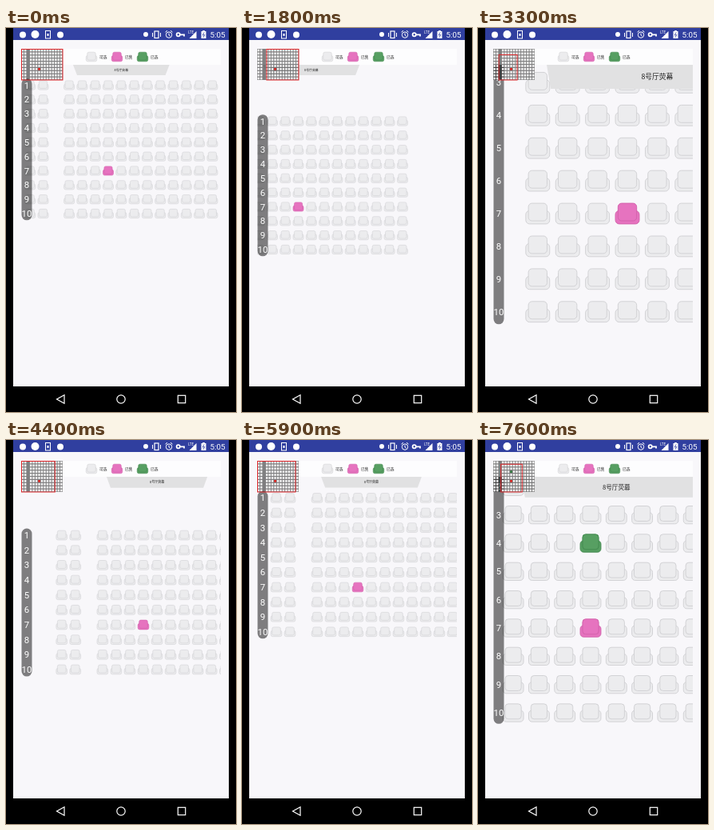
An HTML page with a canvas for the animation above (8 s loop, 288x480 px).

```html
<!DOCTYPE html>
<html lang="zh">
<head>
<meta charset="utf-8">
<title>选座</title>
<style>
  html, body { margin: 0; width: 100%; height: 100%; overflow: hidden; background: #000; }
  canvas { display: block; width: 288px; height: 480px; }
</style>
</head>
<body>
<canvas id="stage"></canvas>
<script>
const LOOP = 8000, STEP = 100, TAP_TIME = 7000;
const ROWS = 10, COLS = 15, AISLE = 2;
const SEAT_W = 0.8, SEAT_H = 0.69, ROW_PITCH = 1.094; // relative to the column pitch
const SOLD = { row: 6, col: 6 }, PICKED = { row: 3, col: 6 };
const VIEW = { left: 19, top: 26, right: 269, bottom: 448, head: 46 };
const CJK = '"Noto Sans CJK SC", "Noto Sans CJK", "Noto Sans CJK JP", sans-serif';
const LATIN = 'Roboto, sans-serif';
const SEAT_COLORS = {
  free: ['#ececee', '#d2d2d5'],
  sold: ['#e673bf', '#d362ac'],
  picked: ['#579f62', '#438a50']
};

// Each move eases to a pose: centre of the sold seat and column pitch.
const START = [128, 178.5, 16.3];
const MOVES = [
  [0, 500, 140.5, 178.5, 16.3],
  [900, 1400, 47.2, 238.5, 16.3],
  [1600, 2200, 140.5, 178.5, 16.3],
  [2800, 3200, 193, 239.4, 40.3],
  [3200, 3300, 187, 232, 37.4],
  [3300, 3400, 176, 219, 32.3],
  [3900, 4200, 172.5, 230, 17.6],
  [4300, 4400, 172, 231, 17.05],
  [4700, 5300, 145, 184, 17],
  [6900, 7200, 141, 235, 32.3]
];

const canvas = document.getElementById('stage');
const ctx = canvas.getContext('2d');
const ratio = window.devicePixelRatio || 1;
canvas.width = 288 * ratio;
canvas.height = 480 * ratio;
ctx.scale(ratio, ratio);

function poseAt(time) {
  let pose = START;
  for (const [from, to, ...goal] of MOVES) {
    if (time <= from) break;
    const p = Math.min(1, (time - from) / (to - from));
    const eased = (1 - Math.cos(p * Math.PI)) / 2;
    pose = pose.map((v, i) => v + (goal[i] - v) * eased);
  }
  return pose;
}

function box(x, y, w, h, color) {
  ctx.fillStyle = color;
  ctx.fillRect(x, y, w, h);
}

function roundBox(x, y, w, h, r) {
  ctx.beginPath();
  ctx.roundRect(x, y, w, h, r);
}

function disc(x, y, r, color = '#fff') {
  ctx.beginPath();
  ctx.arc(x, y, r, 0, Math.PI * 2);
  ctx.fillStyle = color;
  ctx.fill();
}

function line(points, { close, fill, stroke, width = 1 }) {
  ctx.beginPath();
  points.forEach(([x, y]) => ctx.lineTo(x, y));
  if (close) ctx.closePath();
  if (fill) { ctx.fillStyle = fill; ctx.fill(); }
  if (stroke) { ctx.strokeStyle = stroke; ctx.lineWidth = width; ctx.stroke(); }
}

function label(text, x, y, size, color, family, align = 'center') {
  ctx.font = `${size}px ${family}`;
  ctx.textAlign = align;
  ctx.textBaseline = 'alphabetic';
  ctx.fillStyle = color;
  ctx.fillText(text, x, y);
}

function drawSeat(cx, cy, pitch, kind) {
  const w = pitch * SEAT_W, h = pitch * SEAT_H, x = cx - w / 2, y = cy - h / 2;
  [ctx.fillStyle, ctx.strokeStyle] = SEAT_COLORS[kind];
  ctx.lineWidth = Math.min(1, pitch * 0.035);
  roundBox(x, y + h * 0.36, w, h * 0.64, w * 0.16);
  ctx.fill();
  ctx.stroke();
  roundBox(x + w * 0.11, y, w * 0.78, h * 0.85, w * 0.15);
  ctx.fill();
  ctx.stroke();
}

function kindOf(row, col, time) {
  const is = seat => seat.row === row && seat.col === col;
  if (is(SOLD)) return 'sold';
  return is(PICKED) && time >= TAP_TIME ? 'picked' : 'free';
}

function eachSeat(draw) {
  for (let row = 0; row < ROWS; row++)
    for (let col = 0; col < COLS; col++)
      if (col !== AISLE) draw(row, col);
}

function drawNumbers(firstY, pitch) {
  const pad = pitch * SEAT_H / 2 + 2.7, rowPitch = pitch * ROW_PITCH;
  roundBox(19.5, firstY - pad, 13, rowPitch * (ROWS - 1) + pad * 2, 6.5);
  ctx.fillStyle = 'rgba(0,0,0,.494)';
  ctx.fill();
  for (let row = 0; row < ROWS; row++)
    label(row + 1, 26, firstY + row * rowPitch + 4, 11.4, '#fff', LATIN);
}

function drawHeader() {
  box(VIEW.left, VIEW.top, 250, 20, '#fdfdfe');
  [['free', '可选'], ['sold', '已售'], ['picked', '已选']].forEach(([kind, text], i) => {
    drawSeat(107 + i * 32, 36, 16.8, kind);
    label(text, 117 + i * 32, 37.8, 4.7, '#222', CJK, 'left');
  });
}

function drawScreen(centerX, pitch) {
  const half = pitch * 3.7, top = VIEW.head, bottom = top + pitch * 0.8;
  line([[centerX - half, top], [centerX + half, top],
    [centerX + half - 5, bottom], [centerX - half + 5, bottom]], { close: true, fill: '#e1e1e2' });
  const size = pitch * 0.235;
  label('8号厅荧幕', centerX, (top + bottom) / 2 + size * 0.37, size, '#222', CJK);
}

function drawOverview(firstX, firstY, pitch, time) {
  const { left, top } = VIEW, w = 52, h = 39, cellW = w / COLS, cellH = h / ROWS;
  box(left, top, w, h, 'rgba(0,0,0,.494)');
  const colors = { free: '#f4f4f4', sold: '#e8201c', picked: '#2c7a3a' };
  eachSeat((row, col) => box(left + col * cellW + 0.5, top + row * cellH + 0.6,
    cellW - 1, cellH - 1.2, colors[kindOf(row, col, time)]));

  const seatLeft = firstX - pitch * SEAT_W / 2, seatTop = firstY - pitch * SEAT_H / 2;
  const toX = x => left + Math.min(w, Math.max(0, (x - seatLeft) / pitch * 3.5));
  const toY = y => top + Math.min(h, Math.max(0, (y - seatTop) / (pitch * ROW_PITCH) * cellH));
  const x0 = toX(left), x1 = toX(VIEW.right), y0 = toY(VIEW.head), y1 = toY(VIEW.bottom);
  ctx.strokeStyle = '#e0282c';
  ctx.lineWidth = 1;
  ctx.strokeRect(x0 + 0.5, y0 + 0.5, x1 - x0 - 0.5, y1 - y0 - 0.5);
}

function drawStatusBar() {
  box(9, 0, 270, 15, '#303f9f');
  const white = { stroke: '#fff', width: 1 };
  disc(21, 8.5, 4);
  disc(36.5, 8, 5);
  ctx.strokeStyle = '#fff';
  ctx.lineWidth = 1;
  ctx.strokeRect(49.5, 3.5, 6, 9.5);
  box(51.5, 7, 2, 3, '#fff');
  disc(68, 8.5, 4);
  disc(175, 8, 3);

  ctx.lineWidth = 1.2;
  ctx.strokeRect(186, 4, 5, 8.5);
  line([[183.5, 6], [183.5, 11]], white);
  line([[193.5, 6], [193.5, 11]], white);

  ctx.beginPath();
  ctx.arc(204, 8.6, 3.7, 0, Math.PI * 2);
  ctx.stroke();
  line([[204, 6.5], [204, 9], [205.5, 10]], white);
  line([[199.5, 5.2], [202, 3.2]], white);
  line([[206, 3.2], [208.5, 5.2]], white);

  ctx.lineWidth = 1.8;
  ctx.beginPath();
  ctx.arc(215.7, 8.3, 2.1, 0, Math.PI * 2);
  ctx.stroke();
  line([[218, 8.3], [223, 8.3], [223, 10.5]], { stroke: '#fff', width: 1.8 });

  label('LTE', 228, 7, 4.5, '#fff', LATIN, 'left');
  line([[229.5, 13], [238.5, 13], [238.5, 4]], { close: true, fill: '#fff' });
  box(244.5, 4, 6, 9, '#fff');
  box(246.2, 3, 2.6, 1, '#fff');
  line([[248.2, 5.5], [246.2, 9], [248.8, 8.5], [247, 11.8]], { stroke: '#303f9f', width: 0.8 });
  label('5:05', 255.5, 12, 9.8, '#fff', LATIN, 'left');
}

function drawNavBar() {
  box(0, 448, 288, 32, '#000');
  line([[73, 458.7], [63.5, 464], [73, 469.3]], { close: true, stroke: '#fff', width: 1.2 });
  ctx.beginPath();
  ctx.arc(144, 464, 5.2, 0, Math.PI * 2);
  ctx.stroke();
  ctx.strokeRect(215.3, 459.3, 9.4, 9.4);
}

function draw(time) {
  const [soldX, soldY, pitch] = poseAt(time);
  const firstX = soldX - SOLD.col * pitch;
  const firstY = soldY - SOLD.row * pitch * ROW_PITCH;

  box(0, 0, 288, 480, '#000');
  box(9, 15, 270, 433, '#f8f7fa');
  ctx.save();
  ctx.beginPath();
  ctx.rect(VIEW.left, VIEW.top, VIEW.right - VIEW.left, VIEW.bottom - VIEW.top);
  ctx.clip();
  eachSeat((row, col) => drawSeat(firstX + col * pitch, firstY + row * pitch * ROW_PITCH,
    pitch, kindOf(row, col, time)));
  drawNumbers(firstY, pitch);
  drawHeader();
  drawScreen(firstX + 7 * pitch, pitch);
  drawOverview(firstX, firstY, pitch, time);
  ctx.restore();
  drawStatusBar();
  drawNavBar();
}

const begin = performance.now();
function tick() {
  const time = (performance.now() - begin) % LOOP;
  draw(Math.floor(time / STEP) * STEP);
  requestAnimationFrame(tick);
}
tick();
</script>
</body>
</html>
```
